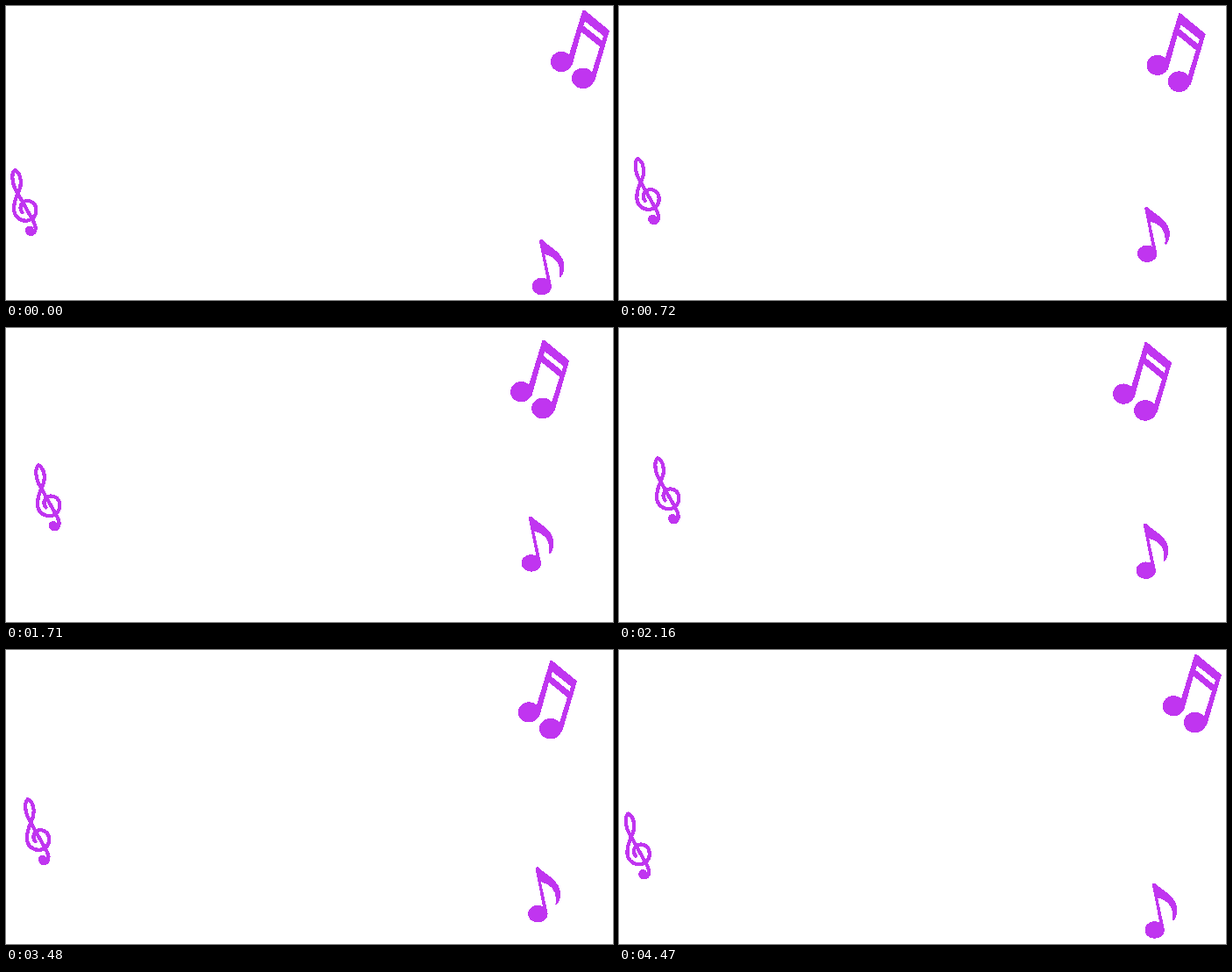
Write an HTML page that moves like this. It is 692x335 px and loops after 4.5 s.

```html
<!DOCTYPE html>
<html lang="en">
<head>
<meta charset="utf-8">
<title>Floating notes</title>
<style>
  html, body { margin: 0; width: 100%; height: 100%; overflow: hidden; background: #fff; }
  svg { display: block; width: 692px; height: 335px; }
</style>
</head>
<body>
<svg viewBox="0 0 692 335" fill="#c035f0" shape-rendering="crispEdges">
  <g id="beamed">
    <path fill-rule="evenodd" d="M657.5 4.5H659.5L688 28 671 86 665 82 667.5 77 677 46.5 656 29.5 645 69 640 62Z
      M660 17.5 681 34 679.5 39.5 658.5 22.5Z"/>
    <ellipse cx="633.2" cy="63.5" rx="12.3" ry="11.6"/>
    <ellipse cx="657.8" cy="82.3" rx="12.8" ry="11.8"/>
  </g>
  <g id="single">
    <path d="M607.8 267.5Q608.5 266 611.5 266.2C616 273 634 279 636.4 294C637 301 635 306 632.2 309.3L630.8 308.5C633.5 297 628 286 614.3 283L622 319 617 314Z"/>
    <ellipse cx="610.8" cy="319.5" rx="11.2" ry="9.8"/>
  </g>
  <g id="clef">
    <g fill="none" stroke="#c035f0" stroke-width="4.2" stroke-linecap="round">
      <path d="M10 187C6 190 6.500 202 12 211L30 243C33.500 249 35 255 32 258.300C30 260.300 27 260.500 25 258.500"/>
      <path d="M10 187C15 189 18 197 16.500 205C15 213 9 219 9 231C9 240 16 245 23 244.700C31 244.200 34.700 238 34.400 232C34 225 29 221.800 24 222C18 222.500 14 229 18.500 235"/>
    </g>
    <circle cx="26.8" cy="255.6" r="5"/>
  </g>
</svg>
<script>
  const LOOP = 4500, STEP = 30;

  // Each part drifts in a straight line to (dx, dy) at time "turn", then back.
  const parts = [
    { id: "beamed", turn: 2590, dx: -69.4, dy: 13.9 },
    { id: "single", turn: 1185, dx: -14.3, dy: -61.3 },
    { id: "clef", turn: 2160, dx: 34, dy: -38.6 }
  ].map(p => ({ ...p, node: document.getElementById(p.id) }));

  function draw(time) {
    const t = Math.floor((time % LOOP) / STEP) * STEP;
    for (const { node, turn, dx, dy } of parts) {
      const k = t < turn ? t / turn : (LOOP - t) / (LOOP - turn);
      node.setAttribute("transform", `translate(${dx * k} ${dy * k})`);
    }
  }

  const start = performance.now();
  function tick() {
    draw(performance.now() - start);
    requestAnimationFrame(tick);
  }
  draw(0);
  requestAnimationFrame(tick);
</script>
</body>
</html>
```
